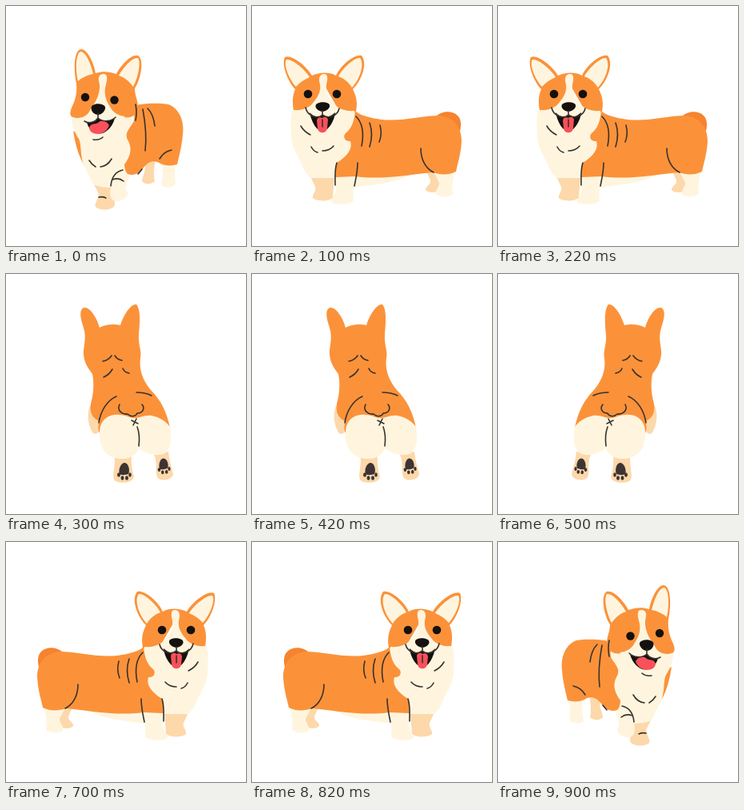
Write an HTML page that moves like this. It is 300 px wide and 300 px high and loops after 1.1 s.

```html
<!DOCTYPE html>
<html lang="en">
<head>
<meta charset="utf-8">
<title>Turning corgi</title>
<style>
  html, body { margin: 0; width: 100%; height: 100%; overflow: hidden; background: #fff; }
  svg { display: block; width: 100%; height: 100%; }
  .o { fill: #fb923a; }
  .c { fill: #fff5df; }
  .t { fill: #fdd8aa; }
  .k { fill: #14110f; }
  .r { fill: #f9505a; }
  .l { fill: none; stroke: #38322d; stroke-width: 1.6; stroke-linecap: round; stroke-linejoin: round; }
  .tail { fill: #f6832f; }
  .pad { fill: #3d3433; }
  .pose { visibility: hidden; animation: turn 1.1s step-end infinite; animation-delay: calc(var(--at) - 1.1s); }
  .first { animation-name: start; animation-delay: 0s; }
  @keyframes turn { 0% { visibility: visible; } 18.18182%, 100% { visibility: hidden; } }
  @keyframes start { 0% { visibility: visible; } 9.09091%, 100% { visibility: hidden; } }
</style>
</head>
<body>
<svg viewBox="0 0 300 300">
  <defs>
    <g id="walk">
      <path class="t" d="M173 195L187 191C185 203 184 211 186 219C181 224 173 223 170 219C170 212 176 207 173 195Z"/>
      <path class="c" d="M193 192L214 192C210 203 211 212 212 222C208 228 198 228 194 224C196 212 197 202 193 192Z"/>
      <path class="t" d="M108 219L134 222L136 249C133 256 116 256 112 251C110 247 115 243 116 235Z"/>
      <path class="o" d="M152 128C165 121 190 121 203 123C217 128 223 145 221 160C220 174 217 185 214 198C207 200 199 200 193 197C186 192 178 194 172 202C167 209 160 213 152 210L143 200Z"/>
      <path class="o" d="M84 156C86 170 90 186 97 198L104 170Z"/>
      <path class="c" d="M82 134C81 147 85 155 89 163C95 170 92 180 96 196C101 208 106 215 109 223C116 226 125 227 131 227C128 239 133 245 140 244C147 243 153 239 152 233C147 228 151 222 154 214C150 209 148 204 148 198C157 186 157 177 153 169C148 161 152 156 156 150C160 145 161 142 160 136L120 125Z"/>
      <path class="o" d="M88 97C84 78 85 55 94 54C102 54 110 72 112 84C121 81 130 82 138 85C143 75 156 60 165 62C173 66 169 91 161 103C161 114 167 121 164 130C161 141 149 141 140 137C133 135 127 129 122 122C116 118 110 127 105 131C101 139 91 142 84 139C79 138 80 132 82 127C87 117 89 108 88 97Z"/>
      <path class="c" d="M90 94C86 76 88 57 94 57C101 59 106 73 109 85C102 86 94 90 90 94Z"/>
      <path class="c" d="M141 87C146 78 157 64 165 65C169 71 165 90 159 101C154 94 148 89 141 87Z"/>
      <path class="c" d="M121 85C127 84 127 90 125 98C122 108 124 117 130 126C134 133 139 137 149 138L117 160L89 140C97 140 103 137 106 128C113 120 118 108 117 98C115 91 115 86 121 85Z"/>
      <circle class="k" cx="99" cy="114" r="5.2"/>
      <circle class="k" cx="135.500" cy="117.500" r="5.200"/>
      <path class="k" d="M106.500 127C108 121 121 121 124 126C125 131 119 136 115 136C111 136 106 132 106.500 127Z"/>
      <path class="k" d="M101 145C107 146 112 144 115 140C121 146 130 144 136 140C134 149 128 156 121 159C112 161 103 155 101 145Z"/>
      <path class="r" d="M104 152C106 146 112 148 115 146C119 142 125 143 129 149C127 155 123 159 115 160C109 160 104 157 104 152Z"/>
      <path class="l" d="M115 134L115 140M98 144C104 148 112 145 115 140C121 146 132 144 137 139M109 167Q117 168 121 164M162 123Q164 133 162 143M171 129C174 145 176 163 174 181M177 128C182 133 185 141 186 150M192 191Q197 182 207 180M104 193Q107 198 112 201M118 201Q127 200 132 191M131 225C132 214 137 207 146 205M133 217Q141 214 147 219M165 210L170 204M116 239Q121 238 125 240"/>
    </g>

    <g id="side">
      <path class="t" d="M218 207L239 207L236 229C233 234 220 234 217 230C216 226 224 223 223 218Z"/>
      <path class="t" d="M72 211L103 212L101 240C95 245 80 244 76 240C75 235 81 231 79 226Z"/>
      <path class="c" d="M120 205L206 207C184 221 152 224 126 227Z"/>
      <path class="c" d="M226 205L256 202C250 216 250 225 251 235C247 239 235 239 230 236C228 231 234 227 234 221Z"/>
      <path class="c" d="M104 212L131 211C127 222 126 233 127 243C123 249 103 249 99 245C99 240 105 235 105 227Z"/>
      <path class="tail" d="M229 139C236 131 250 130 257 137C262 142 262 150 259 160Z"/>
      <path class="o" d="M126 128C131 135 143 139 156 141C182 146 211 137 234 137C252 139 262 151 262 169C261 186 257 197 255 207C245 212 235 211 226 208C200 210 164 218 129 213L104 214L101 180Z"/>
      <path class="c" d="M53 122C46 139 49 154 49 164C50 177 57 187 61 195C64 205 69 211 73 215L104 215C105 208 104 202 106 196C120 187 126 178 123 169C116 170 113 163 117 159C125 153 128 143 129 130L88 116Z"/>
      <path class="o" d="M54 104C43 92 37 72 41 64C49 60 68 75 75 87C84 83 96 82 105 87C110 75 128 59 137 62C145 72 137 93 126 104C131 114 132 122 130 132C119 134 111 131 106 126L91 100L75 125C68 131 58 133 52 130C50 119 51 111 54 104Z"/>
      <path class="c" d="M55 101C46 91 39 73 43 67C51 66 67 80 72 89C65 92 59 96 55 101Z"/>
      <path class="c" d="M108 88C113 78 128 64 135 65C141 73 135 91 125 102C121 95 114 90 108 88Z"/>
      <path class="c" d="M89 85C95 84 95 90 93 98C92 108 95 115 101 121C107 128 116 132 128 131C126 146 112 157 90 158C67 158 53 146 53 130C65 131 73 126 77 120C84 112 86 105 85 98C83 91 84 86 89 85Z"/>
      <circle class="k" cx="70" cy="110" r="5.300"/>
      <circle class="k" cx="106" cy="110" r="5.300"/>
      <path class="k" d="M79.500 125C80 119 96 119 97 124C98 128 92 132 88 132C84 132 79 128 79.500 125Z"/>
      <path class="k" d="M72 133C78 140 85 140 88 136C92 140 98 139 104 133C103 142 99 149 94 154L82 154C77 149 74 142 72 133Z"/>
      <path class="r" d="M81 143C82 138 86 139 88 140C90 138 94 138 95 142L94 153C93 160 83 160 82 153Z"/>
      <path class="l" d="M88 131L88 137M67 127C69 137 81 142 88 136C96 142 107 137 109 128M88 142L88 151M61 150Q65 157 73 161M74 176Q77 182 82 183M88 181Q97 181 102 175M130 138C138 146 140 160 137 175M147 146Q152 160 147 176M160 149Q163 160 159 170M106 196C103 205 104 215 104 224M132 196C132 207 130 215 128 225M211 178C211 192 217 203 227 208"/>
    </g>

    <g id="paw">
      <path class="pad" d="M0-6C6-6 7 5 5 8C2 9-3 10-6 8C-8 4-5-6 0-6Z"/>
      <ellipse class="pad" cx="-7" cy="9" rx="2" ry="2.700"/>
      <ellipse class="pad" cx="-2.500" cy="13" rx="2" ry="2.700"/>
      <ellipse class="pad" cx="3" cy="13" rx="2" ry="2.700"/>
      <ellipse class="pad" cx="7" cy="9" rx="1.800" ry="2.700"/>
    </g>

    <g id="back">
      <path class="t" d="M105 165C101 174 102 188 108 198C111 202 116 199 117 194L116 165Z"/>
      <path class="t" d="M135 224L157 227C156 238 158 247 160 254C158 262 139 263 135 257C132 250 138 240 135 224Z"/>
      <path class="t" d="M185 226L203 222C204 233 207 242 209 250C208 258 193 260 189 254C186 246 190 237 185 226Z"/>
      <path class="o" d="M97 95C99 82 100 76 96 64C92 52 92 43 98 42C106 42 114 56 117 67C124 63 135 62 143 64C147 51 156 37 163 38C169 45 167 64 166 76C165 89 170 96 168 105C166 120 171 133 181 145C194 158 201 173 205 192L196 205L119 202C114 196 115 190 117 184C109 181 104 174 106 162C110 148 110 136 108 125C101 116 96 107 97 95Z"/>
      <path class="c" d="M118 190C122 179 132 175 142 176C150 176 154 180 161 180C168 180 173 176 182 177C192 179 200 184 205 191C208 207 206 220 197 225C188 228 176 225 166 218C162 229 150 233 136 230C120 226 114 208 118 190Z"/>
      <path class="o" d="M141 163C138 171 146 176 152 175C157 180 163 177 164 174C171 174 174 167 169 161Z"/>
      <path class="l" d="M121 109Q128 108 132 102M136 102Q139 107 145 108M122 129Q129 126 133 119M146 118Q148 123 154 124M116 186C118 172 126 158 138 153M163 148Q174 148 182 152M142 163C138 171 146 176 152 175C157 180 163 177 164 174C171 174 174 168 170 163M157 183L165 187M163 181L159 189M164 191C167 199 167 207 166 215"/>
      <use href="#paw" x="148" y="242"/>
      <use href="#paw" transform="translate(197 236) scale(.9) rotate(-5)"/>
    </g>
  </defs>

  <use class="pose first" href="#walk"/>
  <use class="pose" style="--at:.1s" href="#side"/>
  <use class="pose" style="--at:.3s" href="#back"/>
  <g transform="translate(301) scale(-1 1)">
    <use class="pose" style="--at:.5s" href="#back"/>
    <use class="pose" style="--at:.7s" href="#side"/>
    <use class="pose" style="--at:.9s" href="#walk"/>
  </g>
</svg>
</body>
</html>
```
